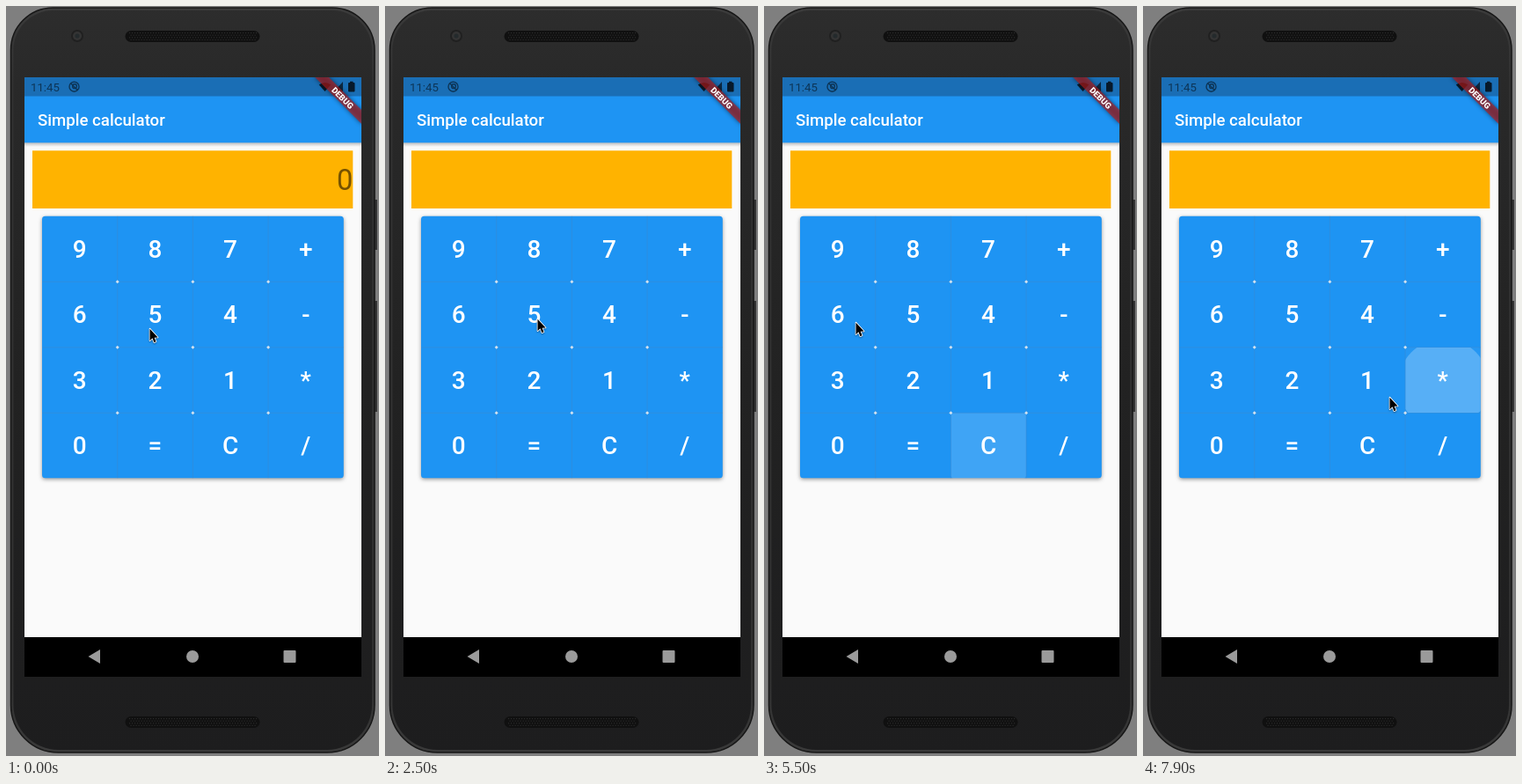
Recreate the animation shown at these times as an HTML page with a canvas. Size 424 by 852 pixels, loop 8 s.

```html
<!DOCTYPE html>
<html lang="en">
<head>
<meta charset="utf-8">
<title>Simple calculator</title>
<style>
html, body { margin: 0; width: 100%; height: 100%; overflow: hidden; background: #7f7f7f; }
canvas { display: block; width: 424px; height: 852px; }
</style>
</head>
<body>
<canvas id="stage"></canvas>
<script>
const W = 424, H = 852, LOOP = 8000, STEP = 100;
const FONT = 'Roboto, "Liberation Sans", sans-serif';
const BLUE = '#1e94f3';
const KEYS = ['987+', '654-', '321*', '0=C/'];
const GRID = { x: 41, y: 238.8, w: 85.7, h: 74.5 };

// [time, text on the display]
const DISPLAY = [[0, '0'], [500, '5'], [900, '55'], [2100, ''], [3000, '5'],
  [3900, '50'], [5300, ''], [6200, '6'], [7800, '']];

// [time the splash starts, key]
const PRESSES = [[100, '5'], [510, '5'], [1790, '-'], [2700, '5'],
  [3580, '='], [4975, 'C'], [5890, '6'], [7555, '*']];

// [time, x, y] of the pointer tip
const PATH = [[0, 163, 366], [700, 163, 366], [1000, 398, 366], [1200, 411, 366],
  [1500, 350, 358], [2100, 350, 358], [2500, 173, 355], [2800, 173, 357],
  [3200, 176, 508], [3400, 176, 510], [3600, 222, 573], [4100, 276, 604],
  [4500, 268, 679], [4800, 262, 506], [5100, 260, 506], [5500, 104, 359],
  [5800, 103, 360], [6300, 103, 540], [6500, 104, 540], [6900, 330, 452],
  [7200, 398, 432], [7400, 352, 436], [7600, 350, 438], [7900, 280, 444]];

const canvas = document.getElementById('stage');
const screenCtx = canvas.getContext('2d');
const dpr = window.devicePixelRatio || 1;
const base = document.createElement('canvas');
for (const c of [canvas, base]) {
  c.width = W * dpr;
  c.height = H * dpr;
  c.getContext('2d').scale(dpr, dpr);
}

function rect(g, x, y, w, h, color) {
  g.fillStyle = color;
  g.fillRect(x, y, w, h);
}

function round(g, x, y, w, h, r, color) {
  g.beginPath();
  g.roundRect(x, y, w, h, r);
  if (color) { g.fillStyle = color; g.fill(); }
}

function disc(g, x, y, r, color) {
  g.beginPath();
  g.arc(x, y, r, 0, 7);
  g.fillStyle = color;
  g.fill();
}

function poly(g, points, color) {
  g.beginPath();
  points.forEach(([x, y]) => g.lineTo(x, y));
  g.closePath();
  g.fillStyle = color;
  g.fill();
}

function text(g, str, x, y, size, weight, color, align = 'left') {
  g.font = `${weight} ${size}px ${FONT}`;
  g.textAlign = align;
  g.fillStyle = color;
  g.fillText(str, x, y);
}

function fade(g, x0, y0, x1, y1, ...stops) {
  const grad = g.createLinearGradient(x0, y0, x1, y1);
  stops.forEach(([at, color]) => grad.addColorStop(at, color));
  return grad;
}

function speaker(g, y) {
  round(g, 135.5, y, 153, 13, 6.5, '#101010');
  for (let row = 0; row < 4; row++)
    for (let x = 140 + row % 2 * 1.5; x < 285; x += 3)
      rect(g, x, y + 2 + row * 2.6, 1.2, 1.2, '#2b2b2b');
}

function drawPhone(g) {
  rect(g, 0, 0, W, H, '#7f7f7f');
  rect(g, 418, 220, 4, 57, '#353535');
  rect(g, 418, 335, 4, 126, '#353535');
  round(g, 5.5, 2, 413.5, 846, [48, 48, 54, 54],
    fade(g, 0, 0, 0, H, [0, '#3b3b3b'], [.1, '#303030'], [.9, '#303030'], [1, '#3a3a3a']));
  g.strokeStyle = '#161616';
  g.lineWidth = 1.5;
  g.stroke();
  round(g, 8.5, 5, 407.5, 840, [45, 45, 51, 51],
    fade(g, 0, 0, 0, H, [0, '#2d2d2d'], [.1, '#292929'], [.5, '#222222'], [1, '#1d1d1e']));
  disc(g, 81, 34, 7, '#202020');
  disc(g, 81, 34, 5, '#343434');
  disc(g, 81, 34, 2.5, '#242a2c');
  speaker(g, 28);
  speaker(g, 807);
}

function drawStatus(g) {
  const dark = '#0d3557';
  rect(g, 21, 81, 383, 21.5, '#1a6eb5');
  text(g, '11:45', 28, 96.8, 13.2, 400, dark);
  g.strokeStyle = dark;
  g.lineWidth = 1.4;
  g.beginPath();
  g.arc(77.5, 91.7, 5.5, 0, 7);
  g.moveTo(73.8, 88);
  g.lineTo(81.2, 95.4);
  g.stroke();
  g.beginPath();
  g.arc(78, 91.2, 2.4, 0, 7);
  g.stroke();

  g.beginPath();
  g.moveTo(362.5, 97);
  g.arc(362.5, 97, 10, -2.3, -.84);
  g.fillStyle = '#07192a';
  g.fill();
  poly(g, [[383, 86], [383, 97], [373, 97]], '#0c2942');
  round(g, 389, 87, 7.5, 10.5, 1, '#07192a');
  rect(g, 391, 85.7, 3.5, 1.6, '#07192a');
}

function drawBanner(g) {
  g.save();
  g.beginPath();
  g.rect(21, 81, 383, 636);
  g.clip();
  g.translate(404, 81);
  g.rotate(Math.PI / 4);
  g.filter = 'blur(2.5px)';
  rect(g, -37.3, 26.1, 74.6, 11.2, 'rgba(0,0,0,.5)');
  g.filter = 'none';
  rect(g, -37.3, 26.1, 74.6, 11.2, 'rgba(183,28,28,.627)');
  text(g, 'DEBUG', 1.5, 35.1, 9.5, 900, '#fff', 'center');
  g.restore();
}

function drawKeys(g) {
  const { x, y, w, h } = GRID;
  g.shadowColor = 'rgba(0,0,0,.4)';
  g.shadowBlur = 4 * dpr;
  g.shadowOffsetY = 1.5 * dpr;
  round(g, x, y, w * 4, h * 4 - .5, 3.5, BLUE);
  g.shadowColor = 'transparent';
  g.shadowOffsetY = 0;
  for (let i = 1; i < 4; i++) {
    rect(g, x + i * w - .5, y, 1, h * 4 - .5, 'rgba(70,135,195,.4)');
    rect(g, x, y + i * h - .5, w * 4, 1, 'rgba(70,135,195,.4)');
  }
  for (let i = 0; i <= 4; i++)
    for (let j = 0; j <= 4; j++) {
      // only the inner junctions show the page behind
      if (i % 4 === 0 || j % 4 === 0) continue;
      const px = x + i * w, py = y + j * h, s = 2;
      poly(g, [[px - s, py], [px, py - s], [px + s, py], [px, py + s]], '#d3e2ef');
    }
}

function drawBase(g) {
  drawPhone(g);
  rect(g, 21, 102, 383, 615, '#fafafa');
  rect(g, 21, 155, 383, 5, fade(g, 0, 155, 0, 160, [0, 'rgba(0,0,0,.25)'], [1, 'rgba(0,0,0,0)']));
  rect(g, 21, 102, 383, 53.3, BLUE);
  drawStatus(g);
  text(g, 'Simple calculator', 36, 136, 18.64, 500, '#fff');
  drawBanner(g);
  rect(g, 30, 164.3, 364.3, 65.7, '#ffb300');
  drawKeys(g);
  rect(g, 21, 717, 383, 45, '#000');
  poly(g, [[93.5, 739], [107, 731], [107, 747]], '#9a9a9a');
  disc(g, 212, 739, 7, '#9a9a9a');
  round(g, 315.5, 732, 14, 14, 1, '#9a9a9a');
}

function keyBox(key) {
  const row = KEYS.findIndex(k => k.includes(key));
  return [GRID.x + KEYS[row].indexOf(key) * GRID.w, GRID.y + row * GRID.h];
}

function drawSplash(g, age, key) {
  if (age <= 0 || age >= 700) return;
  const grow = Math.min(1, age / 400);
  const alpha = 1 - Math.max(0, age - 400) / 300;
  const [x, y] = keyBox(key);
  g.save();
  round(g, x + .3, y + .3, GRID.w - .6, GRID.h - .6, 3);
  g.clip();
  rect(g, x, y, GRID.w, GRID.h, `rgba(255,255,255,${.03 * alpha})`);
  disc(g, x + GRID.w / 2 + 6 * (1 - grow), y + GRID.h / 2 + 35 * (1 - grow), 60 * grow,
    `rgba(255,255,255,${.23 * alpha})`);
  g.restore();
}

function pointerAt(t) {
  const i = PATH.findIndex(p => p[0] > t);
  if (i < 0) return PATH[PATH.length - 1].slice(1);
  const [t0, x0, y0] = PATH[i - 1], [t1, x1, y1] = PATH[i];
  const k = (t - t0) / (t1 - t0);
  return [x0 + (x1 - x0) * k, y0 + (y1 - y0) * k];
}

function drawPointer(g, [x, y]) {
  const shape = [[0, 0], [0, 14.6], [3.3, 11.6], [5.6, 16.8], [8, 15.8], [5.8, 10.8], [10.3, 10.6]];
  g.save();
  g.translate(x + .5, y + .7);
  g.scale(.88, .92);
  g.lineJoin = 'round';
  g.lineWidth = 1.8;
  g.strokeStyle = '#fff';
  g.shadowColor = 'rgba(0,0,0,.3)';
  g.shadowBlur = 2 * dpr;
  g.shadowOffsetY = dpr;
  poly(g, shape, '#000');
  g.stroke();
  g.shadowColor = 'transparent';
  poly(g, shape, '#000');
  g.restore();
}

function draw(t) {
  const g = screenCtx;
  g.drawImage(base, 0, 0, W, H);
  const shown = DISPLAY.filter(d => d[0] <= t).pop()[1];
  text(g, shown, 394.3, 209, 32.6, 400, '#755200', 'right');
  PRESSES.forEach(([at, key]) => drawSplash(g, t - at, key));
  for (const key of KEYS.join('')) {
    const [x, y] = keyBox(key);
    text(g, key, x + GRID.w / 2 - .2, y + 47, 27.96, 500, '#fff', 'center');
  }
  drawPointer(g, pointerAt(t));
}

drawBase(base.getContext('2d'));
const start = performance.now();
function tick() {
  const t = (performance.now() - start) % LOOP;
  draw(Math.floor(t / STEP) * STEP);
  requestAnimationFrame(tick);
}
tick();
</script>
</body>
</html>
```
